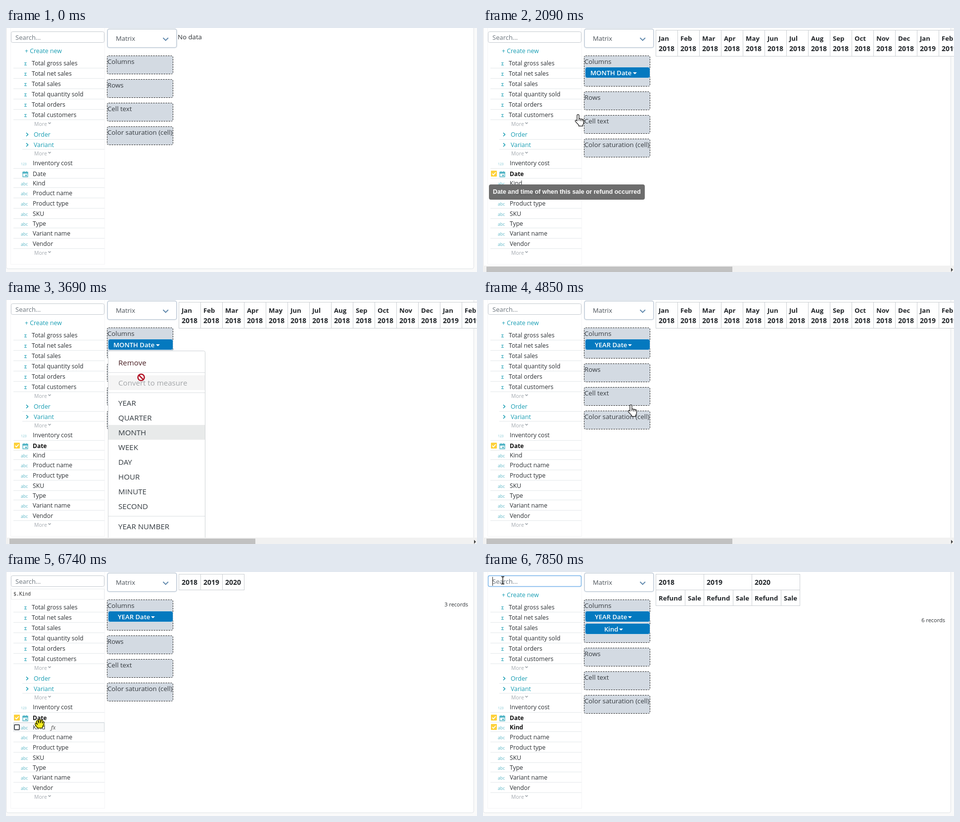
An HTML page for the animation above (8000 ms loop, 952 by 496 pixels).

```html
<!DOCTYPE html>
<html lang="en">
<head>
<meta charset="utf-8">
<title>Matrix builder</title>
<style>
html, body { margin: 0; width: 100%; height: 100%; overflow: hidden; background: #fafafa; }
svg { display: block; font-family: "Open Sans", "Noto Sans", sans-serif; }
text { white-space: pre; }
.zone { fill: #d3dae2; stroke: #222; stroke-dasharray: 3 2; }
.line { stroke: #e4e8eb; }
.mono { font-family: "DejaVu Sans Mono", monospace; }
.serif { font-family: "Noto Serif", serif; font-style: italic; }
.tip { display: inline-block; height: 31px; padding: 0 8px; border-radius: 4px; background: #616161; opacity: .92;
  color: #fff; font: bold 12.4px/31px "Liberation Sans", Arial, sans-serif; white-space: nowrap; }
.cursor { fill: #fff; stroke: #111; stroke-width: 1.2; stroke-linejoin: round; }
#halo { fill: #f7ee1c; mix-blend-mode: multiply; }
</style>
</head>
<body>
<svg id="stage" width="952" height="496" viewBox="0 0 952 496"></svg>
<script>
const LOOP = 8000;
const TEAL = '#179db3', INK = '#2b2f33';
const PICK_DATE = 1420, MONTHS = 1760, OPEN = 3160, CLOSE = 4760, PICK_YEAR = 4850,
      YEARS = 5130, PICK_KIND = 6840, KINDS = 7200, FOCUS = 7700;

// Markup helpers
const text = (x, y, s, size = 12.2, fill = INK, extra = '') =>
  `<text x="${x}" y="${y}" font-size="${size}" fill="${fill}" ${extra}>${s}</text>`;
const rect = (x, y, w, h, fill, extra = '') =>
  `<rect x="${x}" y="${y}" width="${w}" height="${h}" fill="${fill}" ${extra}/>`;
const path = (d, stroke, width = 1, extra = 'fill="none"') =>
  `<path d="${d}" stroke="${stroke}" stroke-width="${width}" ${extra}/>`;
const rule = (x, y) => `<path class="line" d="M${x} ${y + .5}H199"/>`;
const during = (from, to, body) => `<g data-from="${from}" data-to="${to}">${body}</g>`;
const BOLD = 'font-weight="700"';

function page() {
  return rect(.5, -6, 945, 495.5, '#fff', 'stroke="#dee2e6" rx="4"') +
    path('M9.5 0V480.5H199.5V0', '#f4f5f6');
}

function search() {
  const box = (stroke, width) =>
    rect(10.5, 7.5, 188, 22, '#fff', `rx="3" stroke="${stroke}" stroke-width="${width}"`);
  return during(0, FOCUS, box('#c5cad0', 1)) +
    during(FOCUS, LOOP, box('#78b4ea', 1.4)) +
    text(19, 24, 'Search...', 13, '#6c757d') +
    during(FOCUS, LOOP, path('M19.5 10V28', '#222'));
}

const more = y => text(57, y + 4, 'More', 10.5, '#a5abb1') +
  path(`M85.5 ${y - 3}l2.5 2.5l2.5 -2.5`, '#9aa1a8', 1.5);

const calendar = (x, y) =>
  path(`M${x + .5} ${y + 2}h10v9.5h-10zM${x + 3} ${y}v2M${x + 8} ${y}v2`, '#4fb3c4', 1.3) +
  rect(x, y + 2, 11, 3, '#4fb3c4') + rect(x + 5.5, y + 7, 3, 3, '#4fb3c4');

const check = y => rect(16, y - 6, 12, 12, '#fdd13a', 'rx="1"') +
  path(`M18.5 ${y}l2.5 2.7l4.8 -5.2`, '#fff', 1.7);

function hover(from, to, top, height, name, fxX) {
  const mid = top + height / 2;
  return during(from, to,
    rect(10.5, 34.5, 188, 21, '#fff', 'stroke="#d5d9dd" stroke-dasharray="1 1"') +
    text(15, 48, '$.' + name, 9.75, '#333', 'class="mono"') +
    rect(15.5, top + .5, 183, height - 1, '#f8f9fa', 'stroke="#d8dde2"') +
    rect(17, mid - 5, 10, 10, '#fff', 'rx="1" stroke="#4a4f55" stroke-width="1.8"') +
    text(fxX, mid + 4, 'ƒx', 11, '#555', 'class="serif"'));
}

function fields() {
  let out = '';
  ['gross sales', 'net sales', 'sales', 'quantity sold', 'orders', 'customers'].forEach((name, i) => {
    const y = 71 + 21 * i;
    out += text(37, y + 4.5, 'Σ', 9, TEAL, 'font-weight="600"') +
      text(52, y + 5, 'Total ' + name) + rule(15, y + 10);
  });
  [['Order', 216, 226], ['Variant', 237, 246]].forEach(([name, y, line]) => {
    out += path(`M41 ${y - 3}l3.5 3.5l-3.5 3.5`, TEAL, 1.5) +
      text(56, y + 5, name, 12.3, TEAL, 'font-weight="500"') + rule(33, line);
  });
  out += more(195) + more(255) + more(457);
  out += text(30, 279, '123', 6.8, '#7cc5d2') + text(54, 279, 'Inventory cost') + rule(15, 285);
  out += calendar(33.5, 291) + rule(15, 305);
  [['Kind', 315, 324], ['Product name', 335, 345], ['Product type', 356, 366], ['SKU', 377, 387],
   ['Type', 397, 406], ['Variant name', 417, 427], ['Vendor', 438, 448]].forEach(([name, y, line], i) => {
    out += text(30, y + 4.5, 'abc', 8.6, '#58b5c5') + rule(15, line);
    if (i) out += text(54, y + 5, name);
  });
  const pickable = (name, y, at) =>
    during(0, at, text(54, y + 5, name)) +
    during(at, LOOP, text(54, y + 5, name, 12, '#111', BOLD) + check(y));
  return out + pickable('Date', 296, PICK_DATE) + pickable('Kind', 315, PICK_KIND);
}

function select() {
  return rect(205, 2, 140, 38, '#fff', 'rx="4" stroke="#ccd5df" stroke-width="2"') +
    text(222, 26, 'Matrix', 13, '#495057') +
    path('M317.5 20l5.2 5.2l5.2 -5.2', '#5d86ab', 1.8);
}

function zones(chips) {
  const grow = chips ? 25 * chips : 0;
  return ['Columns', 'Rows', 'Cell text', 'Color saturation (cell)'].map((name, i) => {
    const y = 56 + 48 * i + (i ? grow : 0);
    return rect(204.5, y + .5, 133, 37 + (i ? 0 : grow), '', 'class="zone" rx="3"') +
      text(205, y + 17, name, 13.25, '#363b40');
  }).join('');
}

function chip(y, x, label, caretX) {
  return rect(206.5, y - .5, 131, 22, '#0479bf', 'rx="4" stroke="#e4ebf1" stroke-width=".8"') +
    text(x, y + 16, label, 13.1, '#fff', 'font-weight="600"') +
    `<path d="M${caretX} ${y + 10}h8l-4 4z" fill="#fff"/>`;
}

function cell(x, y, w, h, ...lines) {
  return rect(x + .5, y + .5, w, h, '#fff', 'stroke="#cbcfd3"') +
    lines.map((s, i) => text(x + 6, y + 22 + 21 * i, s, /\d/.test(s) ? 14 : 13.2, '#212529', BOLD)).join('');
}

function months() {
  const names = 'Jan Feb Mar Apr May Jun Jul Aug Sep Oct Nov Dec'.split(' ');
  return Array.from({ length: 14 }, (_, i) =>
    cell(349 + 44 * i, 4, 44, 53, names[i % 12], 2018 + Math.floor(i / 12) + '')).join('');
}

const records = (y, n) => text(934, y, n + ' records', 11, INK, 'text-anchor="end"');
const years = () => [0, 1, 2].map(i => cell(349 + 44 * i, 4, 44, 32, 2018 + i + '')).join('') + records(70, 3);
const kinds = () => [0, 1, 2].map(i => {
  const x = 349 + 97 * i;
  return cell(x, 4, 97, 32, 2018 + i + '') + cell(x, 36, 59, 32, 'Refund') + cell(x + 59, 36, 38, 32, 'Sale');
}).join('') + records(102, 6);

function menu() {
  const item = (y, s, fill = '#333a40') => text(227, y + 5.5, s, 15.1, fill);
  const split = y => path(`M207 ${y + .5}H402`, '#dcdfe2');
  const units = ['YEAR', 'QUARTER', 'MONTH', 'WEEK', 'DAY', 'HOUR', 'MINUTE', 'SECOND'];
  return rect(206.5, 103.5, 196, 400, '#fff', 'rx="3" stroke="#cfd3d6"') +
    item(127, 'Remove', '#4a2024') + split(147) +
    rect(207, 153, 195, 30, '#f5f5f5') + item(168, 'Convert to measure', '#a3a6a9') + split(188) +
    rect(207, 254, 195, 30, '#e8eaea') +
    units.map((s, i) => item(209 + 30 * i, s)).join('') + split(439) + item(460, 'YEAR NUMBER');
}

function scrollbar() {
  return rect(0, 483, 952, 13, '#f1f1f1') + rect(7, 485, 497, 11, '#c1c1c1') +
    '<path d="M946 487.5l4 4l-4 4z" fill="#444"/>';
}

const tip = (y, s) =>
  `<foreignObject x="12" y="${y}" width="420" height="31"><div class="tip">${s}</div></foreignObject>`;

// Pointer shapes, each drawn around its hot spot
const shapes = {
  arrow: '<path class="cursor" d="M0 0V16l3.8-3.5l2.5 6l2.6-1.1l-2.5-5.8h5.2z"/>',
  hand: '<path class="cursor" d="M-2 2q0-2 2-2t2 2v7q2-1.5 3.5 .5q2-1.2 3.3 .6q2.7-.6 2.7 2v4q0 3-2 5v2.5h-8v-2l-6.5-7q-1.6-2.3 .2-3t2.8 1.6zM2 9v4M5.5 9.5v4M8.8 10.1v3.5"/>',
  grab: '<path class="cursor" d="M-4 9l-4.5-6q-1.5-2 0-3t3 1l1 1.3l-1.7-6q-.3-2 1.2-2.2t2 1.2l1.5 4v-6q.2-1.8 1.6-1.8t1.6 1.8l.2 5.5l1.4-5q.6-1.6 1.9-1.3t1.2 2l-.8 5l1.4-2.5q1-1.3 2-.5t.4 2l-3 7l-1 3.5z"/>',
  stop: '<circle r="6.5" fill="#fff" stroke="#b3182a" stroke-width="2.6"/>' + path('M-4.5 -4.5L4.5 4.5', '#b3182a', 2.6),
  beam: path('M-3 -7.5H-1L0 -6.5L1 -7.5H3M0 -6.5V6.5M-3 7.5H-1L0 6.5L1 7.5H3', '#111', 1.3)
};
const shapeTimes = [['arrow', 170, 830], ['grab', 830, 1620], ['hand', 1620, 3660], ['stop', 3660, 3775],
  ['hand', 3775, 5650], ['grab', 5650, 7480], ['beam', 7480, LOOP]];

const stage = document.getElementById('stage');
stage.innerHTML = page() +
  text(38, 51, '+ Create new', 12.3, TEAL, 'font-weight="500"') +
  hover(890, 980, 265, 20, 'Inventory cost', 144) +
  hover(980, 1620, 286, 20, 'Date', 91) +
  hover(5840, 6120, 286, 20, 'Date', 91) +
  hover(6120, 7030, 306, 19, 'Kind', 90) +
  search() + fields() + select() +
  during(0, PICK_DATE, zones(0)) +
  during(PICK_DATE, PICK_KIND, zones(1)) +
  during(PICK_KIND, LOOP, zones(2) + chip(105, 245, 'Kind', 275)) +
  during(PICK_DATE, PICK_YEAR, chip(80, 217, 'MONTH Date', 303)) +
  during(PICK_YEAR, LOOP, chip(80, 226, 'YEAR Date', 293)) +
  during(0, MONTHS, text(347, 23, 'No data', 13.25)) +
  during(MONTHS, YEARS, months()) +
  during(YEARS, KINDS, years()) +
  during(KINDS, LOOP, kinds()) +
  during(OPEN, CLOSE, menu()) +
  during(MONTHS, YEARS, scrollbar()) +
  during(1650, 2200, tip(318, 'Date and time of when this sale or refund occurred')) +
  during(6960, 7420, tip(337, 'Whether this is a sale or a refund')) +
  '<g id="pointer">' + shapeTimes.map(([name, from, to]) => during(from, to, shapes[name])).join('') +
  during(1300, 1450, '<circle id="halo" cy="1" r="9.5"/>') +
  during(6740, 6890, '<circle cy="1" r="9.5" fill="#f7ee1c" style="mix-blend-mode:multiply"/>') + '</g>';

// Pointer route: time, x, y
const route = [[170, 806, 492], [520, 430, 396], [900, 78, 283], [980, 70, 288], [1450, 70, 288],
  [2090, 192, 176], [2890, 242, 85], [2980, 242, 85], [3020, 247, 96], [3490, 247, 96],
  [3690, 273, 157], [3950, 300, 231], [4140, 300, 231], [4600, 299, 213], [5310, 299, 213],
  [6030, 68, 301], [6120, 68, 306], [6440, 68, 308], [6960, 68, 308], [7530, 42, 20], [7850, 40, 17]];

const slope = (i, k) => (route[i + 1][k] - route[i][k]) / (route[i + 1][0] - route[i][0]);

// Smooth tangent that never overshoots
function tangent(i, k) {
  if (!i || i === route.length - 1) return 0;
  const a = slope(i - 1, k), b = slope(i, k);
  return a * b > 0 ? 2 * a * b / (a + b) : 0;
}

function along(t, k) {
  const last = route.length - 1;
  if (t <= route[0][0]) return route[0][k];
  if (t >= route[last][0]) return route[last][k];
  const i = route.findIndex(p => p[0] > t) - 1;
  const [p, q] = [route[i], route[i + 1]];
  const span = q[0] - p[0], u = (t - p[0]) / span, v = 1 - u;
  return v * v * (1 + 2 * u) * p[k] + u * u * (3 - 2 * u) * q[k] +
    span * u * v * (v * tangent(i, k) - u * tangent(i + 1, k));
}

const pointer = document.getElementById('pointer');
const timed = [...stage.querySelectorAll('[data-from]')].map(el => [el, +el.dataset.from, +el.dataset.to]);

function draw() {
  const t = performance.now() % LOOP;
  for (const [el, from, to] of timed) el.style.display = t >= from && t < to ? '' : 'none';
  pointer.setAttribute('transform', `translate(${along(t, 1).toFixed(2)} ${along(t, 2).toFixed(2)})`);
  requestAnimationFrame(draw);
}
draw();
</script>
</body>
</html>
```
